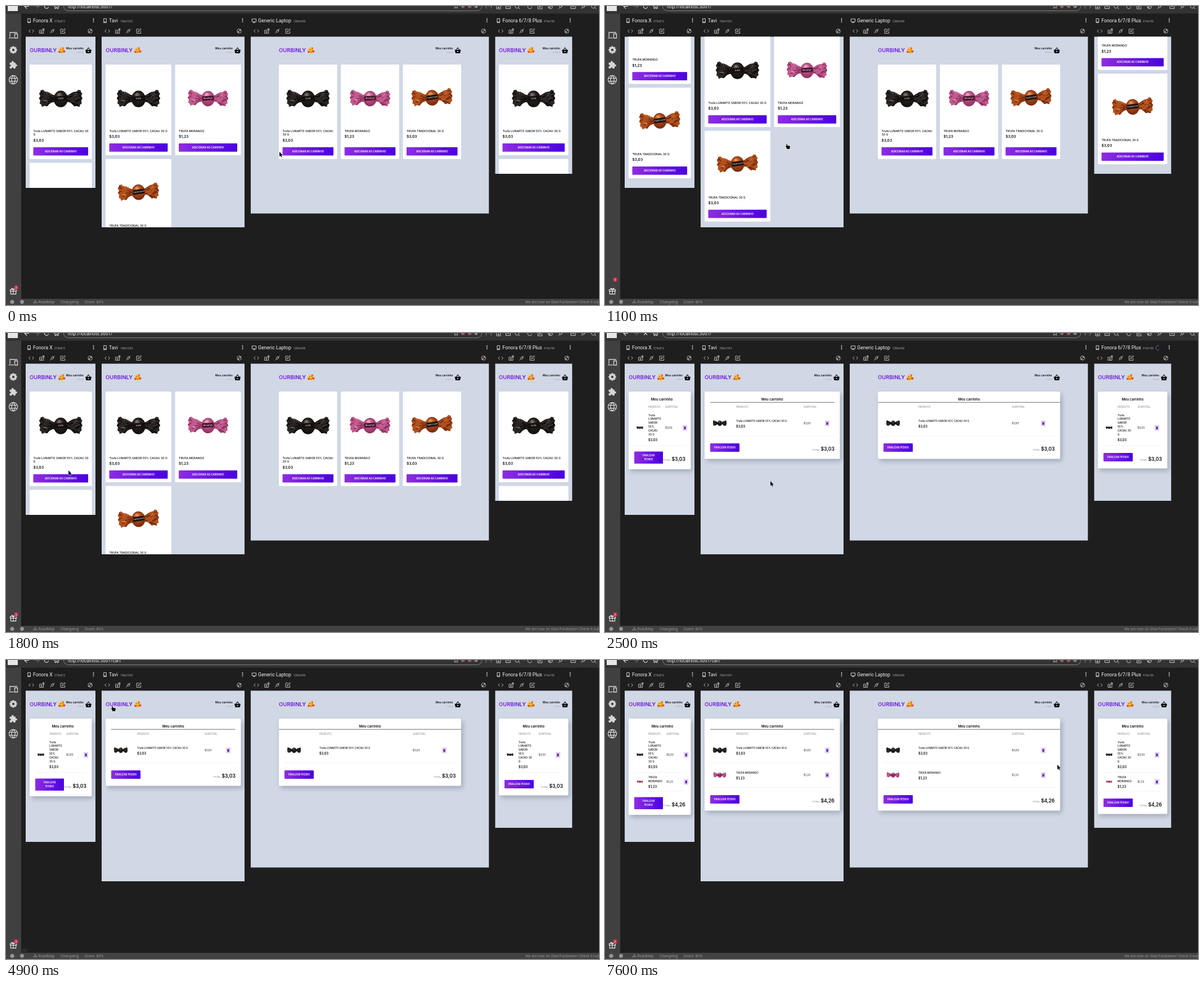
Write an HTML page with a canvas that moves like this. It is 1054 px wide and 531 px high and loops after 8 s.

```html
<!DOCTYPE html>
<html lang="pt">
<head>
<meta charset="utf-8">
<title>Responsive shop preview</title>
<style>
html, body { margin: 0; width: 100%; height: 100%; overflow: hidden; background: #1e1e1e; }
canvas { display: block; width: 100%; height: 100%; }
</style>
</head>
<body>
<canvas id="stage" width="1054" height="531"></canvas>
<script>
const W = 1054, H = 531, LOOP = 8000;
const g = document.getElementById('stage').getContext('2d');
const PAGE = '#d0d7e5', INK = '#0b0b0d', GREY = '#8f8f94';

const products = [
  { name: 'Trufa LUNARTO SABOR 55% CACAU 30 G', price: '$3,03', dy: 60,
    look: { w: 77, dark: '#0f0d0c', mid: '#2a2523', light: '#7d756c', band: '#15100f', label: 'trufa', tilt: 0 } },
  { name: 'TRUFA MORANGO', price: '$1,23', dy: 59.5,
    look: { w: 72, dark: '#8f2f61', mid: '#c05a8d', light: '#e6a9c6', band: '#4a1430', label: 'Morango', tilt: 0.02 } },
  { name: 'TRUFA TRADICIONAL 30 G', price: '$3,03', dy: 58,
    look: { w: 73, dark: '#76290d', mid: '#b0501d', light: '#e39a5c', band: '#1d110c', label: 'Tradicional', tilt: -0.06 } }
];

const devices = [
  { name: 'Fonora X', dims: '375x812', dimX: 86, x: 35, w: 124, h: 268.5, l: 42, r: 152.5, cols: 1, scroll: 301.2,
    title: ['Trufa LUNARTO SABOR 55% CACAU 30', 'G'],
    cart: { narrow: true, img: 62, name: 77, sub: 107, bin: 142, shift: 2.2, btn: 10.5, btnH: 21.5, end: 42,
      lines: ['Trufa', 'LUNARTO', 'SABOR', '55%', 'CACAU', '30 G'] } },
  { name: 'Tavi', dims: '768x1024', dimX: 203.5, x: 170, w: 254, h: 338.5, l: 177, r: 417.5, cols: 2, scroll: 50,
    cart: { img: 204, name: 233, sub: 353, bin: 395, btn: 13.5, btnH: 15, end: 41, rule: 10 } },
  { name: 'Generic Laptop', dims: '1280x950', dimX: 510.5, x: 435, w: 423.3, h: 314, l: 485, r: 809, cols: 3, scroll: 0,
    title: ['Trufa LUNARTO SABOR 55% CACAU', '30 G'], monitor: true,
    cart: { img: 512, name: 557, sub: 723, bin: 779, btn: 13.5, btnH: 15, end: 41, rule: 0 } },
  { name: 'Fonora 6/7/8 Plus', dims: '414x736', dimX: 956, x: 869.3, w: 137, h: 243.5, l: 876, r: 999.5, cols: 1, scroll: 319.3,
    cart: { narrow: true, img: 896, name: 911, sub: 946.5, bin: 981, btn: 13, btnH: 15, end: 40.5,
      lines: ['Trufa', 'LUNARTO', 'SABOR', '55%', 'CACAU 30', 'G'] } }
];

// time, x, y, hand?
const pointer = [
  [0, 486, 259, 0], [200, 462, 259, 0], [300, 405, 254, 0], [400, 345, 248, 0], [500, 325, 245, 0],
  [900, 325, 245, 1], [1500, 300, 245, 1], [1600, 230, 245, 0], [1700, 150, 244, 0], [1800, 111, 244, 0],
  [1900, 97, 250, 1], [2000, 98, 252, 1], [2100, 98, 255, 1], [2300, 150, 262, 0], [2400, 240, 264, 0],
  [2500, 294, 263, 0], [4000, 880, 191, 0], [4200, 557, 191, 0], [4400, 160, 96, 0], [4700, 129, 89, 0],
  [4900, 191, 82, 1], [6100, 350, 248, 1], [7100, 693, 228, 0], [7300, 746, 218, 0], [7600, 804, 186, 0]
];

const icons = {
  code: 'M-1.7-2.6L-4.3 0L-1.7 2.6M1.7-2.6L4.3 0L1.7 2.6',
  shot: 'M-4-1.5H3V4H-4ZM-2.2 1.5H1M-.5 0V3M1-4H4V-1M4-4L1.5-1.8',
  plug: 'M-4 4L-1.5 1.5M-2.5 0L0 2.5L2-.1L0-2ZM1.4-1.6L4-4M.2-3L3 .2',
  edit: 'M0-3.5H-4V4H3.5V.5M-1.5 1.5L-1-.5L3.2-4.3L4.4-3L.3 1.2Z',
  aim: 'M3.8 0A3.8 3.8 0 1 1-3.8 0A3.8 3.8 0 1 1 3.8 0M-2 2L2-2M-2 0V2H0M2 0V-2H0',
  phone: 'M-2.3-3.6H2.3V3.6H-2.3ZM-2.3 2.2H2.3',
  monitor: 'M-3.6-3H3.6V2H-3.6ZM-1.7 3.6H1.7M0 2V3.6',
  screens: 'M-6 3V-5H7M-8 4.6H1M2.5-2.5H7.5V5H2.5Z',
  globe: 'M7 0A7 7 0 1 1-7 0A7 7 0 1 1 7 0M-7-2.5H7M-7 2.5H7M0-7C-4-3-4 3 0 7C4 3 4-3 0-7',
  gift: 'M-5.5-2.5H5.5V.3H-5.5ZM-4.6 .3V5.6H4.6V.3M0-2.5V5.6M0-2.5C-5-3-3-7 0-2.5C3-7 5-3 0-2.5',
  back: 'M4 0H-4M0-4L-4 0L0 4',
  next: 'M-4 0H4M0-4L4 0L0 4',
  reload: 'M3.4-1.5A3.7 3.7 0 1 0 3.7 1M3.6-4V-1.2H.8',
  stop: 'M-3-3L3 3M3-3L-3 3',
  home: 'M-4.5 0L0-4L4.5 0M-3-1V3.5H-1V1H1V3.5H3V-1',
  star: 'M0-4L1.2-1.2L4-1L1.8 .8L2.5 3.6L0 2L-2.5 3.6L-1.8 .8L-4-1L-1.2-1.2Z',
  box: 'M-4-3.5H4V3.5H-4ZM-2 1L0-1L2 1',
  zoom: 'M2.5-1A3.3 3.3 0 1 1-4-1A3.3 3.3 0 1 1 2.5-1M1.7 1.5L4.5 4.5',
  nodes: 'M-4 2.5H-2V.8H-4ZM2 2.5H4V.8H2ZM-1-3H1V-1H-1ZM0-1V1.6H-2M0 1.6H2'
};
for (const k in icons) icons[k] = new Path2D(icons[k]);
const ARROW = new Path2D('M0 0V9.2L2.1 7.3L3.6 10.7L5.1 10L3.6 6.8H6.5Z');
const HAND = new Path2D('M-2.3-4C-1.4-4.4-1-3.7-.9-3V-1.3L3 -.6C4-.3 4 .5 3.8 1.6L3 5H-1.5L-4-.2C-3.6-1-2.9-.7-2.5 0Z');
const WING = new Path2D('M8-5C14-4 17-9 22-11L28-12L31-15L35-14L36-10L38-9L36-4L38 0L36 4L37 9L34 11L33 15L28 13L24 14L19 9C16 7 13 6 8 6Z');

const ramp = (t, a, b) => {
  const p = Math.min(1, Math.max(0, (t - a) / (b - a)));
  return p * p * (3 - 2 * p);
};

function randomizer(seed) {
  return () => (seed = (seed * 16807) % 2147483647) / 2147483647;
}

function text(s, x, y, size, color, { weight = 500, align = 'left', font = 'Inter' } = {}) {
  g.font = `${weight} ${size}px ${font}, sans-serif`;
  g.textAlign = align;
  g.fillStyle = color;
  g.fillText(s, x, y + size * 0.36);
}
const uiText = (s, x, y, size, color) => text(s, x, y, size, color, { weight: 400, font: 'Roboto' });

function rect(x, y, w, h, color, r = 0) {
  g.fillStyle = color;
  g.beginPath();
  g.roundRect(x, y, w, h, r);
  g.fill();
}

function disc(x, y, r, color) {
  g.fillStyle = color;
  g.beginPath();
  g.arc(x, y, r, 0, 7);
  g.fill();
}

function at(x, y, draw, s = 1, turn = 0) {
  g.save();
  g.translate(x, y);
  g.rotate(turn);
  g.scale(s, s);
  draw();
  g.restore();
}

function icon(name, x, y, color = '#d6d6d6', width = 0.9, s = 1) {
  at(x, y, () => {
    g.strokeStyle = color;
    g.lineWidth = width;
    g.stroke(icons[name]);
  }, s);
}

function line(x0, x1, y, color, width = 0.6) {
  rect(x0, y - width / 2, x1 - x0, width, color);
}

function purple(x0, x1) {
  const p = g.createLinearGradient(x0, 0, x1, 0);
  p.addColorStop(0, '#8e2de2');
  p.addColorStop(1, '#4a00e0');
  return p;
}

function button(x, y, w, h, lines, size) {
  rect(x, y, w, h, purple(x, x + w), 1);
  lines.forEach((s, i) =>
    text(s, x + w / 2, y + h / 2 + (i - (lines.length - 1) / 2) * 7, size, '#fff', { weight: 600, align: 'center' }));
}

// Crumpled foil: random creases fanning out from the neck.
function wing(side, look) {
  const rnd = randomizer(side > 0 ? 71 : 913);
  g.save();
  g.scale(side, 1);
  g.clip(WING);
  rect(0, -20, 40, 40, look.mid);
  for (let i = 0; i < 46; i++) {
    const a = rnd() * 1.3 - 0.65, r = 9 + rnd() * 24, len = 3 + rnd() * 7, bend = a + rnd() * 0.5 - 0.25;
    g.strokeStyle = i % 5 < 3 ? look.dark : i % 5 < 4 ? look.mid : look.light;
    g.lineWidth = i % 5 < 3 ? 1.8 : 0.8;
    g.beginPath();
    g.moveTo(r * Math.cos(a), r * Math.sin(a));
    g.lineTo((r + len) * Math.cos(bend), (r + len) * Math.sin(bend));
    g.stroke();
  }
  g.restore();
}

function candy(x, y, look, scale = 1) {
  at(x, y, () => {
    wing(-1, look);
    wing(1, look);
    const shade = g.createRadialGradient(-3, -7, 1, 0, 0, 15);
    shade.addColorStop(0, look.light);
    shade.addColorStop(0.35, look.mid);
    shade.addColorStop(1, look.dark);
    g.fillStyle = shade;
    g.beginPath();
    g.ellipse(0, 1, 12.5, 14.5, 0, 0, 7);
    g.fill();
    at(0, 0, () => {
      rect(-11, -4, 22, 8.5, look.band, 2);
      text(look.label, 0, 0, 4, '#e8ddd4', { align: 'center' });
    }, 1, -0.08);
  }, scale * look.w / 76, look.tilt);
}

function heart(x, y, s) {
  at(x, y, () => {
    g.fillStyle = '#e8344a';
    g.beginPath();
    g.moveTo(0, 2);
    g.bezierCurveTo(-4, -1, -1.5, -3.5, 0, -1.2);
    g.bezierCurveTo(1.5, -3.5, 4, -1, 0, 2);
    g.fill();
  }, s);
}

function face(x, y) {
  disc(x, y, 5.4, '#fcbf2f');
  g.strokeStyle = '#5c3a12';
  g.lineWidth = 0.8;
  for (const [dx, dy, r, a, b] of [[-1.9, -0.6, 1, 3.3, 6.1], [1.9, -0.6, 1, 3.3, 6.1], [0, 1, 2, 0.3, 2.8]]) {
    g.beginPath();
    g.arc(x + dx, y + dy, r, a, b);
    g.stroke();
  }
  heart(x - 4, y + 2.8, 0.9);
  heart(x + 4.4, y + 2, 1);
  heart(x + 2.4, y - 4, 0.7);
}

function basket(x, y) {
  g.fillStyle = INK;
  g.fill(new Path2D(`M${x - 5.5} ${y - 1.3}H${x + 5.5}L${x + 4} ${y + 5}H${x - 4}Z`));
  g.strokeStyle = INK;
  g.lineWidth = 1.1;
  g.stroke(new Path2D(`M${x - 3} ${y - 1}L${x} ${y - 4.8}L${x + 3} ${y - 1}`));
  disc(x, y + 1.8, 1.1, PAGE);
}

function header(d, count) {
  text('OURBINLY', d.l, 79, 9.5, purple(d.l - 10, d.l + 70), { weight: 600 });
  face(d.l + 57, 79);
  text('Meu carrinho', d.r - 14.5, 75.7, 4.8, INK, { weight: 600, align: 'right' });
  text(`${count} itens`, d.r - 14.5, 83, 4, '#a9aebb', { weight: 400, align: 'right' });
  basket(d.r - 6, 79);
}

function shop(d) {
  const gap = 6.7, w = (d.r - d.l - gap * (d.cols - 1)) / d.cols;
  let top = 104;
  for (let i = 0; i < products.length; i += d.cols) {
    const row = products.slice(i, i + d.cols).map((p, k) => ({ p, lines: (i + k === 0 && d.title) || [p.name] }));
    const h = 161 + 6.7 * (Math.max(...row.map(c => c.lines.length)) - 1);
    row.forEach(({ p, lines }, k) => {
      const x = d.l + k * (w + gap);
      rect(x, top, w, h, '#fff', 1.3);
      candy(x + w / 2, top + p.dy, p.look);
      lines.forEach((s, n) => text(s, x + 6.5, top + 118 + n * 6.5, 5.15, INK));
      text(p.price, x + 6.5, top + 128 + (lines.length - 1) * 6.7, 6.5, INK, { weight: 600 });
      button(x + 6.5, top + h - 20.9, w - 13, 14.7, ['ADICIONAR AO CARRINHO'], 4.4);
    });
    top += h + gap;
  }
}

function bin(x, y) {
  rect(x - 4, y - 4.7, 8, 9.4, '#b9b9bf', 0.8);
  rect(x - 3.4, y - 4.1, 6.8, 8.2, '#f1f0f4', 0.5);
  rect(x - 1.8, y - 1.8, 3.6, 4.6, '#6d1ee0', 0.5);
  rect(x - 2.2, y - 2.8, 4.4, 0.8, '#6d1ee0');
}

function cart(d, items) {
  const c = d.cart, shift = items.length > 1 ? c.shift || 0 : 0;
  const rows = items.map((p, i) => ({ p, lines: !c.narrow ? [p.name] : i ? p.name.split(' ') : c.lines }));
  const height = r => c.narrow ? 18 + 7.5 * r.lines.length : 44;
  const start = c.narrow ? 137 : 138.5;
  const last = rows.reduce((y, r) => y + height(r), start);

  g.save();
  g.shadowColor = 'rgba(40,45,70,.28)';
  g.shadowBlur = 9;
  g.shadowOffsetX = 3;
  g.shadowOffsetY = 4;
  rect(d.l, 104, d.r - d.l, last + c.end - 104, '#fff', 2.6);
  g.restore();

  const mid = c.narrow && d.w < 130 ? 101 + shift / 2 : (d.l + d.r) / 2;
  text('Meu carrinho', mid, 118.3, 6, INK, { weight: 600, align: 'center' });
  if (!c.narrow) line(d.l + c.rule, d.r - c.rule, 123.2, '#3a3a3e', 0.8);
  text('PRODUTO', c.name, 131, 4.45, GREY);
  text('SUBTOTAL', c.sub + shift, 131, 4.45, GREY);

  let y = start;
  for (const r of rows) {
    const h = height(r), n = r.lines.length, cy = y + h / 2, first = cy - 1 - 3.6 * n;
    candy(c.img, cy - 0.5, r.p.look, c.narrow ? 0.15 : 0.32);
    r.lines.forEach((s, i) => text(s, c.name, first + 6.9 * i, c.narrow ? 4.7 : 4.5, INK));
    text(r.p.price, c.name, first + 6.9 * (n - 1) + 9.7, 5.7, INK, { weight: 600 });
    text(r.p.price, c.sub + shift, cy, 4.5, '#333');
    bin(c.bin + shift, cy);
    y += h;
    line(d.l + 10, d.r - 10, y, '#e6e6ea');
  }

  const label = c.btnH > 20 ? ['FINALIZAR', 'PEDIDO'] : ['FINALIZAR PEDIDO'];
  button(d.l + 10, last + c.btn, c.btnH > 20 ? 51 : 52, c.btnH, label, 4.2);
  const total = items.length > 1 ? '$4,26' : '$3,03', right = d.r - 9.7;
  text(total, right, last + 23.7, 8.5, INK, { weight: 600, align: 'right' });
  text('TOTAL', right - g.measureText(total).width - 2, last + 25.3, 4.1, GREY, { align: 'right' });
}

function device(d, s) {
  const right = d.x + d.w;
  icon(d.monitor ? 'monitor' : 'phone', d.x + 6, 26, '#e4e4e4');
  uiText(d.name, d.x + 13, 26, 8.75, '#f2f2f2');
  uiText(d.dims, d.dimX, 27.2, 4.9, '#a8a8a8');
  for (let i = -1; i < 2; i++) disc(right - 3.5, 25.5 + i * 2.8, 0.9, '#e8e8e8');
  ['code', 'shot', 'plug', 'edit'].forEach((k, i) => icon(k, d.x + 10 + i * 18.7, 44.5, '#d0d0d0'));
  icon('aim', right - 9.5, 44.5, '#d0d0d0', 0.8);

  g.save();
  g.beginPath();
  g.rect(d.x, 54.5, d.w, d.h);
  g.clip();
  rect(d.x, 54, d.w + 1, d.h + 1, PAGE);
  g.translate(0, -d.scroll * s.scroll);
  header(d, s.count);
  if (s.cart) cart(d, products.slice(0, s.count));
  else shop(d);
  g.restore();
}

function gear(x, y) {
  at(x, y, () => {
    g.fillStyle = '#d6d6d6';
    for (let i = 0; i < 4; i++) {
      g.fillRect(-1.7, -6.6, 3.4, 13.2);
      g.rotate(Math.PI / 4);
    }
    disc(0, 0, 4.9, '#d6d6d6');
    disc(0, 0, 2.2, '#404040');
  });
}

function puzzle(x, y) {
  rect(x - 6.5, y - 4, 10.5, 10.5, '#d6d6d6', 1.2);
  disc(x - 1.2, y - 4.8, 2, '#d6d6d6');
  disc(x + 4.8, y + 1, 2, '#d6d6d6');
  disc(x - 6, y + 1.2, 1.7, '#404040');
  disc(x - 1.2, y + 6.3, 1.7, '#404040');
}

function topBar(s) {
  rect(0, 0, W, 13.5, '#333');
  rect(3, 0, 18, 9, '#e6e6e6');
  icon('back', 37, 0.5, '#e0e0e0', 1.1);
  icon('next', 55, 0.5, '#666', 1.1);
  icon(s.loading ? 'stop' : 'reload', 72, 0.5, '#e0e0e0', 1.1);
  icon('home', 90, 1, '#e0e0e0', 1);
  g.strokeStyle = '#8a8a8a';
  g.lineWidth = 0.9;
  g.beginPath();
  g.roundRect(102.5, -14, 743, 22.5, 8);
  g.stroke();
  uiText(`http://localhost:3001/${s.path}`, 110, 0.7, 8.2, '#ececec');
  icon('star', 800, 0.5, '#cfcfcf', 0.8);
  for (const x of [812, 824, 835]) {
    disc(x, 0.5, 3, '#77716f');
    disc(x + 1.6, 1.8, 1.5, x < 830 ? '#d0463c' : '#a0a0a0');
  }
  uiText('(···)', 852, 0.5, 8, '#b5b5b5');
  ['shot', 'box', 'zoom'].forEach((k, i) => icon(k, 876 + i * 16.5, 1, '#d8d8d8'));
  ['reload', 'edit', 'aim', 'plug'].forEach((k, i) => icon(k, 931 + i * 18.3, 1, '#d8d8d8'));
  ['box', 'plug', 'zoom'].forEach((k, i) => icon(k, 1008 + i * 18.3, 1, '#d8d8d8'));
}

function sideBar(lift) {
  rect(0, 13.5, 27, 507, '#404040');
  icon('screens', 13, 52, '#d6d6d6', 1.3);
  gear(13, 78);
  puzzle(13, 104.5);
  icon('globe', 13, 131, '#d6d6d6', 1.1, 1.08);
  icon('gift', 13, 506, '#e4e4e4', 1.2);
  disc(18, 500 - lift, 4.1, '#c4314b');
  text('3', 18, 500 - lift, 5, '#f3d5da', { align: 'center', font: 'Roboto' });
}

function footer() {
  rect(0, 520, W, 11, '#424242');
  disc(11, 525.5, 3.6, '#949494');
  disc(28.5, 525.5, 3.4, '#949494');
  icon('nodes', 52, 525.5, '#949494', 0.8, 0.85);
  uiText('RoadMap', 57.5, 525.5, 6.8, '#949494');
  uiText('Changelog', 97, 525.5, 6.8, '#949494');
  uiText('Zoom: 60%', 139.5, 525.5, 6.8, '#949494');
  uiText('We are now on Glad Fundraiser! Check it out', 923, 525.5, 6.7, '#949494');
}

function cursor(t) {
  const [, x, y, hand] = pointer.findLast(p => p[0] <= t);
  at(x, hand ? y + 4 : y, () => {
    const shape = hand ? HAND : ARROW;
    g.lineJoin = 'round';
    g.strokeStyle = 'rgba(255,255,255,.75)';
    g.lineWidth = 1.1;
    g.stroke(shape);
    g.fillStyle = '#050505';
    g.fill(shape);
  }, hand ? 1 : 0.92);
}

function stateAt(t) {
  return {
    cart: (t >= 2300 && t < 5400) || t >= 6800,
    count: t < 2300 ? 0 : t < 6800 ? 1 : 2,
    path: (t >= 4000 && t < 6100) || t >= 7100 ? 'cart' : '',
    loading: t >= 2300 && t < 4000,
    status: t >= 4900 && t < 6100,
    scroll: ramp(t, 300, 1000) - ramp(t, 1100, 1800),
    lift: t >= 6800 && t < 7100 ? 14 : 14 * (ramp(t, 800, 1000) - ramp(t, 1200, 1500))
  };
}

function render(now) {
  const t = Math.floor(now % LOOP / 100) * 100, s = stateAt(t);
  rect(0, 0, W, H, '#1e1e1e');
  topBar(s);
  devices.forEach(d => device(d, s));
  if (s.loading) {
    g.strokeStyle = '#5f6cc0';
    g.lineWidth = 1;
    g.beginPath();
    g.arc(983.5, 26.3, 4.2, 1.2, 4.9);
    g.stroke();
  }
  sideBar(s.lift);
  if (s.status) {
    rect(27, 512, 12, 8, '#262626');
    uiText('http', 28.5, 515.5, 4, '#4a4a4a');
  }
  footer();
  cursor(t);
}

const began = performance.now();
function tick() {
  render(performance.now() - began);
  requestAnimationFrame(tick);
}
tick();
</script>
</body>
</html>
```
